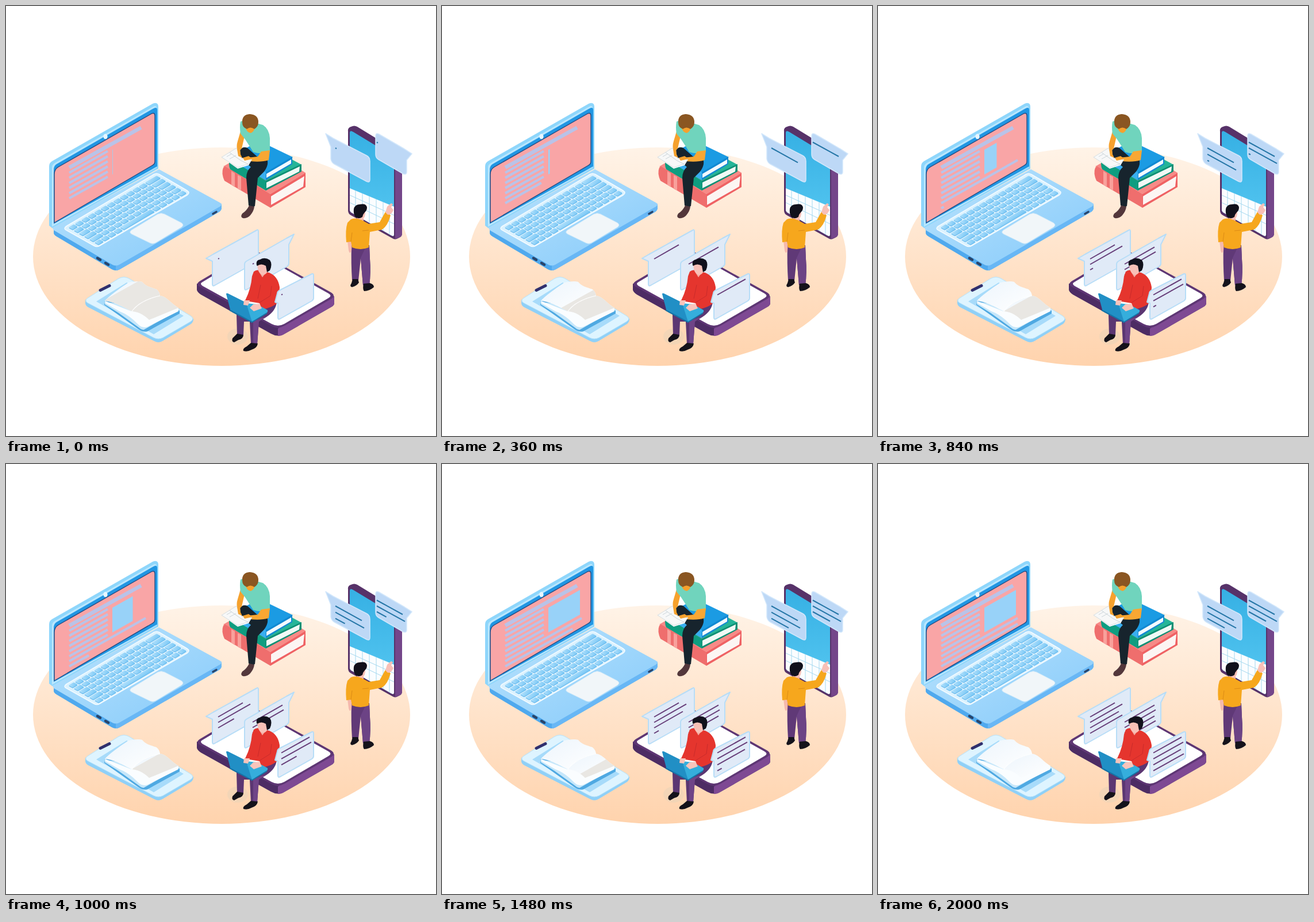
These frames come from a looping animation (748 px wide and 748 px high, 2.04 s). An HTML page:

```html
<!DOCTYPE html>
<html lang="en">
<head>
<meta charset="utf-8">
<title>Isometric learning scene</title>
<style>
html, body { margin: 0; width: 100%; height: 100%; overflow: hidden; background: #fff; }
svg { display: block; width: 100%; height: 100%; }
.draw { stroke-dasharray: 1 2; animation: 2040ms linear infinite; }
.row1 { animation-name: row1; }
.row2 { animation-name: row2; }
.row3 { animation-name: row3; }
.row4 { animation-name: row4; }
.textA { animation-name: textA; }
.textB { animation-name: textB; }
.picture { animation: picture 2040ms infinite; }
.wipe { animation: wipe 2040ms linear infinite; }
@keyframes row1 { 0% { stroke-dashoffset: .96 } 17.6%, 100% { stroke-dashoffset: 0 } }
@keyframes row2 { 0%, 23.5% { stroke-dashoffset: 1 } 41%, 100% { stroke-dashoffset: 0 } }
@keyframes row3 { 0%, 39.5% { stroke-dashoffset: 1 } 56.8%, 100% { stroke-dashoffset: 0 } }
@keyframes row4 { 0%, 70% { stroke-dashoffset: 1 } 88%, 100% { stroke-dashoffset: 0 } }
@keyframes textA {
  0%, 5.5% { stroke-dashoffset: 1 } 17.65% { stroke-dashoffset: .53 }
  25.5% { stroke-dashoffset: .23 } 33%, 100% { stroke-dashoffset: 0 }
}
@keyframes textB {
  0%, 40% { stroke-dashoffset: 1 } 56.9% { stroke-dashoffset: .52 }
  72.5% { stroke-dashoffset: .12 } 82%, 100% { stroke-dashoffset: 0 }
}
@keyframes picture {
  0% { clip-path: inset(0 98.5% 0 0); animation-timing-function: cubic-bezier(.333, 0, .667, 0) }
  56.9%, 100% { clip-path: inset(0 0% 0 0) }
}
@keyframes wipe {
  0% { transform: none } 17.65% { transform: translate(30px, 17px) }
  25.5%, 56.9% { transform: translate(41px, 23px) }
  72.5% { transform: translate(59px, 33px) }
  98%, 100% { transform: translate(79px, 45px) }
}
</style>
</head>
<body>
<svg viewBox="0 0 748 748" stroke-linejoin="round">
  <defs>
    <linearGradient id="floor" x2="0" y2="1"><stop stop-color="#fff3e7"/><stop offset="1" stop-color="#ffd3ad"/></linearGradient>
    <linearGradient id="deck" x2="1" y2="1"><stop stop-color="#b9e3fd"/><stop offset="1" stop-color="#86cafa"/></linearGradient>
    <linearGradient id="keyFill" x2="1" y2="1"><stop stop-color="#b5e2fc"/><stop offset="1" stop-color="#74c5f5"/></linearGradient>
    <linearGradient id="glass" x2="0" y2="1"><stop stop-color="#36b0e4"/><stop offset="1" stop-color="#58c9f2"/></linearGradient>
    <linearGradient id="page" x2="1" y2="1"><stop stop-color="#edf5fc"/><stop offset="1" stop-color="#fff"/></linearGradient>
    <clipPath id="unread"><polygon class="wipe" points="120,540 260,462 400,540 260,618"/></clipPath>
    <path id="leftPage" d="M172 513C180 503 203 488 213 481C222 479 231 478 237 480C244 489 256 490 262 493Q267 497 268 504C250 508 230 516 219 531C209 527 190 514 172 513Z"/>
    <path id="rightPage" d="M219 531C230 516 250 508 268 504C278 504 290 520 300 525L249 546C238 535 228 532 219 531Z"/>
  </defs>

  <ellipse cx="375" cy="436" rx="328" ry="190" fill="url(#floor)"/>

  <g id="laptop">
    <path d="M83 386V395Q83 398 88 401L184 458Q191 462 198 458L371 358Q375 355 375 351V344L191 440Z" fill="#4fa9ee"/>
    <path d="M191 450V460Q195 460 198 458L371 358Q375 355 375 351V344Z" fill="#68b7f5"/>
    <path d="M80 385L266 284L372 342Q378 345 372 349L197 450Q191 453 185 450L83 390Z" fill="url(#deck)"/>
    <path d="M75 279Q75 273 80 270L255 170Q265 166 265 176V283L80 386L75 382Z" fill="#8ed6fb"/>
    <path d="M80 281Q80 276 85 273L256 175Q262 172 262 179V281L80 384Z" fill="#b9e6fd"/>
    <path d="M83 285Q83 278 88 275L257 178Q263 175 263 181V279L83 379Z" fill="#2196e3"/>
    <path d="M84 293Q84 284 91 280L252 188Q259 184 259 191V270Q259 275 255 277L84 377Z" fill="#f9a5a6" stroke="#254b82" stroke-width="1.4"/>
    <ellipse cx="173" cy="227" rx="3.6" ry="4.6" fill="#e9f7ff"/>
    <g id="screenText" stroke="#b9c3e8" stroke-width="4.2" fill="none">
      <path d="M110 281L235 211.500" stroke-width="6.500"/>
      <path class="draw textA" pathLength="1" d="M110 343L243 268"/>
      <path class="draw textB" pathLength="1" d="M110 352L243 278"/>
    </g>
    <polygon class="picture" points="185,250 240,219 240,262 185,293" fill="#98d2f8"/>
    <path d="M105 383L257 293Q262 290 267 293L315 321Q321 325 315 329L163 417Q158 420 153 417L105 390Q99 387 105 383Z" fill="#dcf2fe" stroke="#f4fbff" stroke-width="1.6"/>
    <g id="keyShadow" fill="#58b1ea"></g>
    <g id="keys" fill="url(#keyFill)"></g>
    <path d="M218 390L264 362Q270 359 276 362L305 377Q311 381 305 385L262 411Q256 415 250 412L219 397Q213 394 218 390Z" fill="#f1f6f9" stroke="#c9e7fa"/>
    <g stroke="#28456c" stroke-width="4.500" stroke-linecap="round">
      <path d="M159 438.500L164 441.500M173 447L178 450"/>
      <path d="M360 361.500L366 358" stroke-width="3.500"/>
    </g>
  </g>

  <g id="tablet">
    <path d="M138 511V517Q138 521 143 524L258 583Q265 587 272 583L322 553Q326 550 326 544Z" fill="#8fd0f7"/>
    <path d="M142 508L196 474Q205 469 214 474L321 539Q329 544 321 549L273 577Q265 581 257 577L143 517Q135 513 142 508Z" fill="#def4ff" stroke="#b4e1fb"/>
    <path d="M164 494.500L180 486.500" stroke="#30306e" stroke-width="5" stroke-linecap="round"/>
    <path d="M157 514L210 481L309 539L257 571Z" fill="#a7dbfa"/>
    <path d="M171 515L215 484L302 530V535L246 566Q238 568 230 562L171 520Z" fill="#4fa9e2"/>
    <path d="M171 515L302 528L240 563Q236 564 232 560L196 534L172 519Z" fill="#c6e7fa"/>
    <path d="M172 513L218 531L266 508L300 526V531L246 558Q237 561 230 554Q214 537 197 531L173 517Z" fill="#fafdff"/>
    <g fill="url(#page)"><use href="#leftPage"/><use href="#rightPage"/></g>
    <g fill="#e9e7e3" clip-path="url(#unread)"><use href="#leftPage"/><use href="#rightPage"/></g>
    <path d="M219 531C230 516 250 508 268 504" fill="none" stroke="#fff" stroke-width="1.200"/>
  </g>

  <g id="bookStack">
    <polygon points="378,279 440,244 521,290 460,327" fill="#f78a87"/>
    <path d="M378 281Q374 291 380 304L460 351V327L381 279Z" fill="#ef6e6d"/>
    <path d="M392 287V311L398 315V291ZM403 294V318L409 321V297Z" fill="#f8a09b"/>
    <polygon points="460,327 521,290 521,315 460,351" fill="#ef6264"/>
    <polygon points="461,331 519,296 517,314 461,346" fill="#fcf5f3"/>
    <polygon points="390,267 443,238 514,276 452,304" fill="#25b598"/>
    <path d="M390 266Q386 275 390 284L452 321V304Z" fill="#0f9d80"/>
    <polygon points="452,304 514,275 514,288 452,321" fill="#0e8f74"/>
    <polygon points="453,307 511,279 510,288 453,317" fill="#f1faf6"/>
    <polygon points="412,250 441,235 499,263 452,290" fill="#1b9be3"/>
    <polygon points="412,265 452,289 452,303 412,280" fill="#39aef0"/>
    <polygon points="452,289 498,262 498,275 452,303" fill="#1189d2"/>
    <polygon points="453,292 496,267 496,274 453,299" fill="#f3faff"/>
  </g>

  <g id="reader">
    <path d="M407 251Q412 243 420 247L437 262L454 266Q458 276 449 288L438 299L433 348Q428 351 422 347L418 299Q418 287 426 280L408 266Z" fill="#17242d"/>
    <path d="M423 347L432 349Q431 357 425 364Q420 370 412 369Q407 367 411 361Q419 356 423 347Z" fill="#53373b"/>
    <path d="M408 218L416 222L410 248L403 254Q400 244 403 235Z" fill="#f5a12d"/>
    <path d="M408 201Q417 196 433 203L447 207Q458 214 459 230L459 253Q445 259 430 254Q424 244 416 232L408 222Q406 211 408 201Z" fill="#70d4bd"/>
    <path d="M459 251L457 268Q444 272 425 270L419 264L438 262L444 253Z" fill="#f9a733"/>
    <path d="M375 263L401 247L410 264L428 267L422 277L403 283Z" fill="#fff"/>
    <path d="M375 263L401 247L410 265L428 267L421 275L403 281Z" fill="#f7f8f8" stroke="#d6dcdf"/>
    <path d="M389 255L409 269L421 275M384 262L393 257M389 266L400 260" fill="none" stroke="#cbd4d9"/>
    <path d="M402 249L407 248L408 258L411 264L404 261ZM412 264L422 261L429 266L415 269Z" fill="#f5a12d"/>
    <path d="M416 209L433 208Q433 218 426 221Q418 220 416 209Z" fill="#f5a12d"/>
    <path d="M411 203Q410 189 424 188Q439 189 439 202Q439 210 432 214Q425 209 419 214Q411 211 411 203Z" fill="#8a5622"/>
  </g>

  <g id="smartphone">
    <path d="M595 218Q594 212 600 210Q606 207 611 210L683 254Q689 258 689 264V396Q689 401 684 403L680 405Q676 407 672 404L600 364Q595 361 595 356Z" fill="#573269"/>
    <path d="M677 273Q677 264 671 260L684 255Q689 259 689 264V396Q689 401 684 403L677 405Z" fill="#74468a"/>
    <path d="M598 221Q598 215 604 219L670 259Q675 263 675 269V397Q675 402 670 399L602 360Q598 358 598 354Z" fill="url(#glass)"/>
    <path d="M598 317L675 349V397Q675 402 670 399L602 360Q598 358 598 354Z" fill="#fbfdff"/>
    <path d="M598 329L675 364M598 342L675 379M608 321V363M620 326V370M632 331V377M644 336V384M656 341V391M667 346V397" fill="none" stroke="#a4d8ef"/>
    <g fill="#bdd8f6" stroke="#d2e7fb" stroke-width="1.500">
      <path d="M556 222L569 230L627 260Q633 263 633 270V302Q633 308 627 305L571 275Q566 272 565 266V245Z"/>
      <path d="M643 226Q643 220 649 223L692 248L706 257L697 268V289Q697 294 691 292L648 267Q643 264 643 258Z"/>
    </g>
    <g id="phoneNotes" stroke="#2576a7" stroke-width="2"></g>
  </g>

  <g id="pointer">
    <path d="M601 416L632 416L633 440Q635 463 632 486L621 486L617 439L613 478L602 477Q600 448 601 416Z" fill="#603977"/>
    <path d="M617 438L624 423L632 418L633 440Q635 463 632 486L621 486Z" fill="#6c4385"/>
    <path d="M603 475L612 475L614 481Q610 487 602 489Q597 488 601 482ZM622 483L633 482Q640 484 640 489Q632 496 623 496Q620 493 622 483Z" fill="#15131b"/>
    <path d="M594 409L602 409L601 426Q598 433 596 425Z" fill="#f5b9ae"/>
    <path d="M610 364L622 363V376L612 377Z" fill="#f3afa4"/>
    <path d="M600 371Q608 367 620 373L631 379L650 376L660 358L669 364Q664 383 654 389L633 393L631 420Q617 426 602 420L600 410L592 411Q590 389 594 377Z" fill="#f6a71d"/>
    <path d="M602 394L600 410M631 390L620 391" stroke="#dd8c15" fill="none"/>
    <path d="M660 359L663 349L670 343L673 345L670 350L674 355Q670 364 664 363Z" fill="#f8c0b7"/>
    <path d="M619 355L625 356Q626 369 618 372Q612 371 613 363Z" fill="#f8c0b7"/>
    <path d="M605 353Q607 345 616 345Q626 343 628 350Q628 356 624 359Q621 362 620 367Q612 372 607 366Q604 360 605 353Z" fill="#11111c"/>
  </g>

  <g id="platform">
    <path d="M332 483V494Q333 498 339 502L461 570Q473 577 485 570L565 524Q571 521 571 517V505Z" fill="#4d2c64"/>
    <path d="M473 561V574Q480 574 485 570L565 524Q571 521 571 517V505Z" fill="#7e4993"/>
    <path d="M338 478L421 429Q431 423 441 429L565 498Q575 504 565 510L485 556Q473 563 461 556L338 489Q328 484 338 478Z" fill="#5e3674"/>
    <path d="M342 480L422 432Q431 427 440 432L561 500Q568 504 561 508L484 553Q473 559 462 553L342 487Q336 483 342 480Z" fill="#fff"/>
    <g fill="#e0eaf7" stroke="#b7ddf7" stroke-width="2">
      <path d="M348 439L360 432L436 390Q439 388 439 392V440Q439 443 436 445L363 486Q359 488 359 484V444Z"/>
      <path d="M415 449Q415 446 418 444L488 404L501 397L492 415V448Q492 451 489 453L419 493Q415 495 415 491Z"/>
    </g>
    <g id="backNotes" stroke="#673e79" stroke-width="2"></g>
  </g>

  <g id="typist">
    <ellipse cx="403" cy="575" rx="18" ry="14" fill="#eed4b8" opacity=".7"/>
    <path d="M401 537L420 528L471 514Q470 530 453 541L440 549L437 588H426L424 549L414 549L413 572H402Z" fill="#5b3672"/>
    <path d="M430 548L452 540L440 549L437 588H430Z" fill="#6f4487"/>
    <path d="M402 570L413 572Q413 579 404 581L397 585Q392 584 394 578ZM426 586L438 587Q437 595 427 598Q420 602 413 600Q411 596 419 592Z" fill="#14121a"/>
    <path d="M431 462Q436 458 443 460L458 464Q473 470 476 489L475 513Q467 524 445 528L441 517L423 514L416 512Q426 493 428 470Z" fill="#e5352e"/>
    <path d="M462 487L460 504L441 516M443 485L438 509" fill="none" stroke="#c92b2b"/>
    <path d="M438 459L454 461L446 472Z" fill="#f4aaa0"/>
    <path d="M383 501Q383 499 386 500L416 515Q419 516 420 519L428 550L394 533Q391 531 390 528Z" fill="#218fc5"/>
    <path d="M428 550L418 517L437 519L455 529Q456 532 453 534Z" fill="#35aedc"/>
    <path d="M389 529L428 550L454 534" fill="none" stroke="#1573a6" stroke-width="2"/>
    <path d="M414 512L424 512L421 521L413 520ZM424 525L430 519L441 518L445 526L431 531Z" fill="#f9c4bb"/>
    <path d="M437 449L457 449Q458 466 447 468Q438 466 437 449Z" fill="#f8c0b7"/>
    <path d="M436 451Q434 442 442 441Q450 436 459 442Q464 449 459 460L454 463L452 452Q444 447 437 452Z" fill="#11111c"/>
  </g>

  <path d="M472 500Q472 497 475 495L532 466Q535 465 535 468V508Q535 511 532 513L477 544Q473 546 473 542V517L468 515Z" fill="#e0eaf7" stroke="#b7ddf7" stroke-width="2"/>
  <g id="frontNotes" stroke="#673e79" stroke-width="2"></g>
</svg>
<script>
const byId = id => document.getElementById(id);

function add(parent, tag, attrs) {
  const node = document.createElementNS("http://www.w3.org/2000/svg", tag);
  for (const name in attrs) node.setAttribute(name, attrs[name]);
  byId(parent).appendChild(node);
}

// Slanted rows of writing, one per given width, drawn in turn
function notes(parent, x, y, pitch, slope, widths) {
  widths.forEach((w, i) => {
    const top = y + i * pitch;
    add(parent, "path", {
      class: "draw row" + (i + 1), pathLength: 1,
      d: `M${x} ${top}L${x + w} ${top + w * slope}`
    });
  });
}
notes("phoneNotes", 573, 247, 10.8, .55, [46, 50, 30]);
notes("phoneNotes", 645, 237, 10, .55, [45, 49, 30]);
notes("backNotes", 369, 440, 9.5, -.57, [43, 56, 50, 56]);
notes("backNotes", 429, 449, 9.5, -.57, [52, 54, 52, 54]);
notes("frontNotes", 479, 502.5, 10.4, -.56, [49, 52, 48, 53]);

for (let i = 0; i < 6; i++) {
  const y = 290 + i * 8.9;
  add("screenText", "path", { d: `M110 ${y}L177 ${y - 37.5}` });
}

// Keyboard: each cell is one unit of the slanted grid
function key(col, row, w) {
  const box = { x: col + .08, y: row + .1, width: w - .18, height: .78, rx: .14 };
  add("keyShadow", "rect", { ...box, transform: "matrix(11.1 -6.5 9 5.2 107 386)" });
  add("keys", "rect", { ...box, transform: "matrix(11.1 -6.5 9 5.2 107 385)" });
}
for (let row = 0; row < 5; row++) {
  const first = 1 + row * .2;
  key(0, row, first);
  for (let c = 0; c < 11; c++) key(first + c, row, 1);
  key(first + 11, row, 3 - first);
}
for (let c = 0; c < 14; c++) {
  if (c === 4) key(c, 5, 5);
  else if (c < 4 || c > 8) key(c, 5, 1);
}
</script>
</body>
</html>
```
